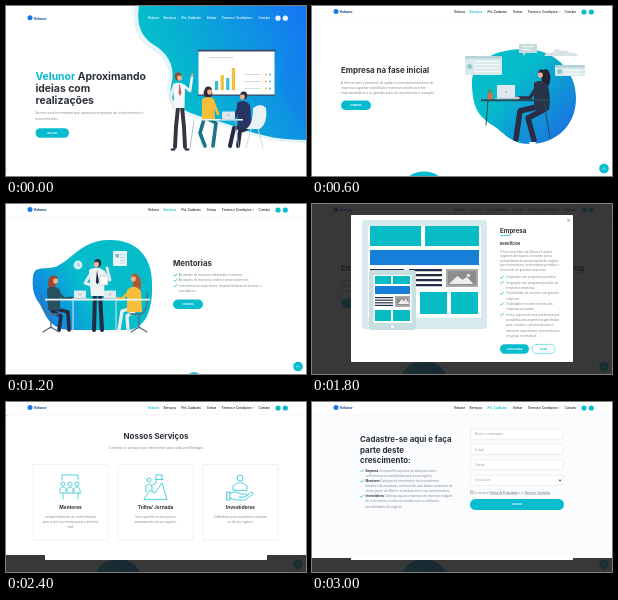
Animation, 300 px wide and 170 px high, one loop 3.6 s. Source, as an HTML page with a canvas:

```html
<!DOCTYPE html>
<html lang="pt">
<head>
<meta charset="utf-8">
<style>
html, body { margin: 0; width: 100%; height: 100%; overflow: hidden; background: #fff; }
canvas { display: block; width: 300px; height: 170px; }
</style>
</head>
<body>
<canvas id="stage"></canvas>
<script>
const W = 300, H = 170, HOLD = 600;
const CYAN = '#08bcd0', TEAL = '#05bccb', BLUE = '#1778e6', INK = '#2b3038', GREY = '#7b8087';
const NAVY = '#252b45', SKIN = '#f3b391', PALE = '#d9eaec', YELLOW = '#f6bd3a';
const HEAD = 'Inter, sans-serif', BODY = '"Open Sans", sans-serif';
const canvas = document.getElementById('stage');
const c = canvas.getContext('2d');
const ratio = window.devicePixelRatio || 1;
canvas.width = W * ratio;
canvas.height = H * ratio;
c.scale(ratio, ratio);

// Drawing helpers
function box(x, y, w, h, fill, r = 0, stroke) {
  c.beginPath();
  c.roundRect(x, y, w, h, r);
  if (fill) { c.fillStyle = fill; c.fill(); }
  if (stroke) { c.strokeStyle = stroke; c.lineWidth = 0.5; c.stroke(); }
}
function oval(x, y, rx, ry, fill) {
  c.beginPath();
  c.ellipse(x, y, rx, ry, 0, 0, Math.PI * 2);
  c.fillStyle = fill;
  c.fill();
}
function shape(d, fill) {
  c.fillStyle = fill;
  c.fill(new Path2D(d));
}
function stroke(d, color, width) {
  c.strokeStyle = color;
  c.lineWidth = width;
  c.lineCap = c.lineJoin = 'round';
  c.stroke(new Path2D(d));
}
function text(s, x, y, size, color = GREY, font = BODY, weight = 400, align = 'left') {
  c.font = `${weight} ${size}px ${font}`;
  c.fillStyle = color;
  c.textAlign = align;
  c.fillText(s, x, y);
}
const title = (s, x, y, size = 7.9, color = INK, align) => text(s, x, y, size, color, HEAD, 700, align);
function lines(list, x, y, step, size = 3, align) {
  list.forEach((s, i) => text(s, x, y + i * step, size, GREY, BODY, 400, align));
}
function gradient(x0, y0, x1, y1, from = TEAL, to = BLUE) {
  const g = c.createLinearGradient(x0, y0, x1, y1);
  g.addColorStop(0, from);
  g.addColorStop(1, to);
  return g;
}
function pill(s, x, y, w, h = 9.6) {
  box(x, y, w, h, CYAN, h / 2);
  text(s, x + w / 2, y + h / 2 + 0.9, 2.5, '#fff', HEAD, 700, 'center');
}
const check = (x, y) => stroke(`M${x} ${y}l1 1.1 2 -2.3`, CYAN, 0.75);

function nav(active, y = 6.8, color = INK) {
  const hero = y > 10;
  oval(24, y - 1.2, 2.5, 2.5, BLUE);
  text('Velunor', 27.5, y + 0.6, 3.4, '#245a9e', HEAD, 800);
  const items = [['Velunor', 142], ['Serviços', 157.5], ['Pré-Cadastro', 175.5], ['Entrar', 201.3], ['Termos e Condições', 215.7], ['Contato', 252.5]];
  items.forEach(([s, x], i) => text(s, x, y, 3, i === active ? CYAN : color, HEAD, 600));
  stroke(`M246.6 ${y - 1.3}l.7 .7 .7 -.7`, color, 0.35);
  for (const x of [272, 279.3]) oval(x, y - 0.8, 2.6, 2.6, hero ? '#e6f6fc' : CYAN);
}
function page(active, bg = '#fff') {
  box(0, 0, W, H, bg);
  box(0, 0, W, 12.5, '#fff');
  box(0, 12.5, W, 0.5, '#f1f3f4');
  nav(active);
}
function topButton() {
  oval(292, 162.5, 4.8, 4.8, CYAN);
  stroke('M290.4 163.2l1.6 -1.6 1.6 1.6', '#fff', 0.6);
}

function head(x, y, hair, side = 1) {
  oval(x - side * 0.7, y - 0.5, 3.5, 3.9, hair);
  oval(x + side * 0.6, y + 0.7, 2.4, 3, SKIN);
  shape(`M${x - 2.6} ${y - 1}Q${x} ${y - 4.6} ${x + 2.8} ${y - 1}Q${x} ${y - 2} ${x - 2.6} ${y - 1}Z`, hair);
}
function laptop(x, y, w, h, color = '#dfe8ef') {
  box(x, y, w, h, color, 1);
  oval(x + w / 2, y + h / 2, 0.9, 0.9, '#9fb3c2');
  box(x - 2, y + h, w + 5, 0.9, '#c6d3dc');
}

function heroScene() {
  box(0, 0, W, H, '#fff');
  shape('M127 0C126 20 131 34 145 43C160 52 166 63 161 80C160 101 178 110 200 115C230 121 250 137 300 137V0Z', '#e3f5fa');
  shape('M133 0C130 18 135 31 148 39C163 48 170 62 165 80C162 98 178 106 200 112C230 118 250 134 300 134V0Z', gradient(170, 80, 300, 20, TEAL, '#1479f2'));
  shape('M300 40C268 52 262 92 300 118Z', 'rgba(20,110,235,.16)');
  nav(-1, 13, '#fff');
  title('Velunor', 29.5, 73.6, 10.4, CYAN);
  const offset = c.measureText('Velunor ').width;
  title('Aproximando', 29.5 + offset, 73.6, 10.4);
  title('ideias com', 29.5, 86, 10.4);
  title('realizações', 29.5, 98.4, 10.4);
  lines(['Somos uma ferramenta que aproxima empresas do conhecimento e', 'investimentos.'], 29.5, 108.2, 5.6, 3.4);
  pill('INICIAR', 29.5, 122.2, 33.5);

  // Presentation board
  box(192.5, 45, 76, 44, '#fff', 0.5);
  box(191.5, 43.8, 78, 1.8, '#3a4a66', 0.8);
  box(191.5, 88.4, 78, 1.3, '#3a4a66', 0.6);
  box(203, 51, 24, 1, '#c9d6de');
  [9, 15, 12, 22].forEach((h, i) => box(209 + i * 5.6, 84 - h, 3.2, h, i % 2 ? YELLOW : '#35c0cf'));
  for (const y of [68, 75, 82]) {
    box(238, y, 17, 0.8, '#c9d6de');
    oval(260, y + 0.4, 1, 1, YELLOW);
    oval(264, y + 0.4, 1, 1, '#35c0cf');
  }

  // Speaker
  stroke('M172 101L170 121 169 141M176 101L178 121 179 141', '#35343f', 3.9);
  stroke('M168.5 143.5h-3M179.5 143.5h3', '#17243a', 1.8);
  shape('M167 78Q173 75 179 79L178.5 102H168.5Z', '#f5f8fb');
  stroke('M168 80L164.5 92 168 102', '#e5edf4', 2.8);
  stroke('M178 80L184 85 186 71', '#f5f8fb', 2.6);
  stroke('M186 71l.3 -3', SKIN, 1.7);
  shape('M173.5 77L172.5 87 174 90 175.5 87Z', '#d8574e');
  head(173, 71, '#8a4a32');

  // Table and two listeners
  stroke('M200 112L210 117 207 140M198 113L194 127 199 140', '#1b7487', 3.6);
  oval(202, 87, 4.4, 5, '#30283a');
  shape('M196 93Q202 89 208 93L209 113H196Z', YELLOW);
  stroke('M198 95L197 106 205 109M207 95L212 108', YELLOW, 2.7);
  head(203, 85, '#30283a');
  stroke('M240 121L228 122 224 140M240 123L234 125 232 140', NAVY, 4);
  shape('M231 97Q238 92 244 99L246 123H232Z', '#283563');
  stroke('M233 100L229 111 221 112', '#283563', 3);
  head(237, 90, NAVY, -1);
  box(181, 113, 56, 1.5, '#f2f6f8', 0.5);
  stroke('M188 115L184 142M229 115L233 142', '#9db2bf', 0.8);
  laptop(216, 105.5, 13, 7.5);
  shape('M247 102Q255 96 260 102Q262 117 254 123H240Q247 119 247 102Z', '#eaf1f4');
  stroke('M245 123L240 142M252 123L257 142', '#d1dbe1', 1);
  box(0, 163, 0.8, 0.8, '#777');
}

function earlyCopy() {
  title('Empresa na fase inicial', 29, 67.2);
  lines(['A Velunor tem o propósito de ajudar o ecossistema brasileiro de', 'empresas a ganhar visibilidade e estreitar a distância entre', 'empreendedores e os grandes polos de investimento e inovação.'], 29, 77.7, 5.2, 3.1);
  pill('CONFIRA', 29, 94.5, 30);
}
function infoCard(x, y, w, h) {
  box(x, y, w, h, PALE, 1);
  box(x, y, w, 2.4, '#b3d0d4', 1);
  for (let row = y + 5; row < y + h - 1; row += 3.3) box(x + 9, row, w - 12, 0.9, '#fff');
  oval(x + 4.7, y + h / 2 + 1, 2.5, 2.5, '#8fc9cf');
}
function earlyScene() {
  page(1);
  earlyCopy();
  shape('M160 80C158 54 185 43 212 43C242 43 264 64 264 92C264 120 244 138 217 138C198 138 192 126 180 119C166 110 161 101 160 80Z', gradient(205, 72, 257, 118, TEAL, '#1878df'));
  infoCard(153, 50, 37, 19);
  shape('M207 38H225V47H214L211 50V47H207Z', '#c6dadd');
  box(210, 40.3, 12, 0.9, '#fff');
  box(210, 43.2, 9, 0.9, '#fff');
  shape('M232 50Q235 45 240 47Q244 40 250 45Q256 44 258 47Q264 46 266 50Z', '#d7e3e5');
  infoCard(243, 59, 30, 11);

  // Woman at a desk
  stroke('M233 99L208 105 204 133M233 103L216 112 222 134', '#2b2b46', 5.4);
  stroke('M203 136h-5M223 137h-5', '#f5f8fa', 1.8);
  oval(234, 72, 4.4, 9, '#252437');
  shape('M222 77Q229 72 236 79Q239 91 237 104H222Z', '#283349');
  stroke('M225 81L218 92 207 92', '#283349', 3.7);
  stroke('M207 92l-4 0', SKIN, 1.8);
  head(229, 68, '#252437', -1);
  box(169, 93.3, 68, 1.9, '#24495b', 0.5);
  stroke('M176 95L174 119M232 95L238 132', '#24495b', 1);
  laptop(185, 79, 18, 13.3);
  stroke('M178 88l-2 -4M178 88l0 -5M178 88l2 -4', '#3a9c69', 1.5);
  box(175.5, 87, 5, 6.2, '#d86a50', 0.6);
  oval(112, 178, 19, 12.5, CYAN);
  topButton();
}

function mentorScene() {
  page(1);
  shape('M27 73C28 59 42 68 53 61C67 54 76 37 102 36C130 35 146 52 146 79C147 104 141 123 123 126H65C42 126 39 108 33 99C27 91 26 82 27 73Z', gradient(28, 105, 76, 79, '#147be9', TEAL));
  box(107, 47, 14, 15, '#eaf4f6', 0.7);
  box(109.5, 50, 3.5, 3.5, '#72bfc8');
  for (const y of [50.5, 53, 56, 58.5]) box(114, y, 5, 0.7, '#b4cdd2');
  oval(72, 61, 4.4, 4.4, '#d6f2f5');
  stroke('M72 58.5V61l2 1', BLUE, 0.5);

  // Standing mentor
  stroke('M89 90L88 126M94 90L96 126', NAVY, 4);
  shape('M83 66Q91 61 99 67L98 92H85Z', '#eef3f6');
  stroke('M85 69L79 79 88 82M98 69L104 76 101 64', '#e4edf3', 2.9);
  box(94, 72, 8, 9, '#fff', 0.5, '#9ab0be');
  shape('M91 66l-1.2 12 1.6 2.4 1.6 -2.4Z', NAVY);
  head(91, 59.5, '#33303e', -1);

  // Seated women on both sides
  stroke('M46 104L62 108 63 126M46 107L55 112 53 126', NAVY, 3.7);
  oval(46, 79, 4, 7, '#9a4937');
  shape('M41 85Q47 80 54 86L54 106H42Z', '#27515f');
  stroke('M51 87L58 95 66 94', '#27515f', 2.8);
  head(49, 76, '#9a4937');
  stroke('M36 89Q34 104 42 110H53M45 110V124M37 128L45 123 53 128', '#526f7f', 1.3);
  stroke('M129 103L116 107 113 126M130 106L121 112 122 126', '#e9edef', 3.4);
  oval(131, 80, 4.2, 8.5, '#a95b35');
  shape('M121 86Q128 79 135 87L136 108H121Z', YELLOW);
  stroke('M123 88L116 95 109 94', YELLOW, 2.8);
  head(128, 74, '#a95b35', -1);
  stroke('M141 89Q143 104 136 110H124M133 110V124M125 128L133 123 141 128', '#526f7f', 1.3);
  box(39, 94.7, 105, 1.8, '#f4f7f9', 0.5);
  stroke('M67 97V128M110 97V128', '#dde7eb', 1);
  laptop(68, 86.5, 12, 7.8);
  laptop(98, 86.5, 12, 7.8);

  title('Mentorias', 167, 62.2);
  for (const y of [71, 76.3, 81.7]) check(168, y);
  lines(['Atividades de mentoria individuais e coletivas;', 'Atividades de mentorias online e presencialmente;', 'com executivos experientes, empreendedores de sucesso e', 'investidores.'], 172.5, 72, 5.4);
  pill('CONFIRA', 167, 95.5, 30);
  oval(188, 176, 8, 8, '#35bde0');
  topButton();
}

function placeholder(x, y, w, h) {
  box(x, y, w, h, '#a9a9a9');
  box(x + 2, y + 2, w - 4, h - 4, '#8d8d8d');
  shape(`M${x + 3} ${y + h - 3}l${w * 0.26} ${-h * 0.45} ${w * 0.17} ${h * 0.22} ${w * 0.13} ${-h * 0.16} ${w * 0.2} ${h * 0.39}Z`, '#eee');
  oval(x + w * 0.7, y + h * 0.35, h * 0.09, h * 0.09, '#eee');
}
function modalScene() {
  page(1);
  earlyCopy();
  title('ng', 262, 67.2);
  oval(112, 177, 23, 20, gradient(92, 160, 133, 170));
  topButton();
  box(0, 0, W, H, 'rgba(27,27,27,.87)');
  box(39, 11, 222, 147, '#fff', 0.7);

  // Monitor
  box(50, 16, 125, 109, PALE, 3);
  box(56, 22, 113, 92, '#fff');
  box(58, 22, 51, 20, '#08bcc6');
  box(113, 22, 54, 20, '#08bcc6');
  box(58, 46, 109, 15, '#187fd8');
  for (let i = 0; i < 4; i++) {
    box(58, 65 + i * 5, 34, 2.2, NAVY);
    box(97, 65 + i * 5, 33, 2.2, NAVY);
  }
  placeholder(134, 65, 32, 18);
  box(108, 88, 27, 22, '#08bcc6');
  box(139, 88, 27, 22, '#08bcc6');

  // Tablet
  box(57, 66, 47, 60, '#c8dfe1', 3);
  box(61.5, 71, 38, 48, '#fff');
  box(63, 72, 16, 8, '#08bcc6');
  box(81, 72, 17, 8, '#08bcc6');
  box(63, 82, 35, 8, '#187fd8');
  for (let i = 0; i < 4; i++) box(63, 93 + i * 2.6, 18, 1.2, NAVY);
  placeholder(83, 92, 15, 11);
  box(63, 106, 16, 11, '#08bcc6');
  box(81, 106, 17, 11, '#08bcc6');
  oval(80.5, 122.5, 1.6, 1.6, '#fff');

  stroke('M255.6 15.4l2.2 2.2M257.8 15.4l-2.2 2.2', '#555', 0.5);
  title('Empresa', 188, 28.8, 6.2);
  box(188, 31.3, 10, 0.7, CYAN);
  title('Benefícios', 188, 41.4, 3.9);
  lines(['O foco prioritário da Velunor é apoiar', 'negócios de impacto iniciantes com a', 'possibilidade de apresentação do negócio', 'para investidores, aceleradoras privadas e', 'executivos de grandes empresas.'], 188, 48.6, 4.55);
  for (const y of [73.3, 78.7, 89.4, 100, 110.7]) check(188.5, y);
  lines(['Integração com programas paralelos', 'Integração com programa privados de', 'fomento a empresas', 'Possibilidade de conexão com grandes', 'empresas', 'Visibilidade e reconhecimento das', 'empresas acionadas', 'Com o suporte de uma plataforma que', 'possibilita uma experiência gamificada', 'para o usuário, conectando com os', 'mentores especialistas, com mentorias', 'em grupo e individual.'], 194, 74.4, 5.32, 2.95);
  pill('CADASTRAR', 188, 140.2, 29);
  box(220, 140.4, 23, 9.2, '#fff', 4.6, CYAN);
  text('Voltar', 231.5, 145.9, 2.4, CYAN, HEAD, 700, 'center');
}

// The lower part of the stage keeps the dimmed page while the top is renewed.
function aboveModal(bottom, draw) {
  modalScene();
  c.save();
  c.beginPath();
  c.rect(0, 0, W, bottom);
  c.clip();
  draw();
  c.restore();
}

function people(x, y) {
  for (const dx of [-7, 0, 7]) stroke(`M${x + dx - 2} ${y}a2 2 0 1 0 4 0a2 2 0 1 0 -4 0M${x + dx - 3} ${y + 8}v-3q3 -4 6 0v3`, CYAN, 0.65);
}
function servicesScene() {
  page(0);
  title('Nossos Serviços', 150, 37.3, 7.9, INK, 'center');
  lines(['Conheça os serviços que oferecemos para cada perfil/estágio'], 150, 46.5, 5, 3.3, 'center');
  const cards = [
    ['Mentores', 'compartilhamento de conhecimentos', 'para incluir sua empresa para o próximo', 'nível.'],
    ['Trilha/ Jornada', 'Uma experiência única para o', 'encantamento do seu negócio.'],
    ['Investidores', 'Visibilidade para investidores visitarem', 'ou do seu negócio.']
  ];
  cards.forEach(([name, ...copy], i) => {
    const x = 27 + i * 85;
    box(x, 62.5, 75, 75.5, '#fff', 1, '#dfe3e6');
    title(name, x + 37.5, 107.3, 4.8, INK, 'center');
    lines(copy, x + 37.5, 115.7, 5.2, 2.95, 'center');
  });
  people(64, 82);
  stroke('M54 91H75M57 91V97M72 91V97M56 78V73H72V78', CYAN, 0.65);
  stroke('M138 97L144 88 149 91 156 81 161 97ZM150 81V73h7l-1.5 2.3 1.5 2.2h-7M141 78a2 2 0 1 0 4 0a2 2 0 1 0 -4 0M140 90v-6q3 -4 6 0v5M145 84l5 -3', CYAN, 0.7);
  stroke('M231 76a3 3 0 1 0 6 0a3 3 0 1 0 -6 0M227 88v-4q7 -7 14 0v4ZM224 91l6 -1 5 2h5q2 2 -1 3h-6M240 94l6 -4q3 1 0 3l-7 5h-9l-6 -2M221 90h3v8h-3Z', CYAN, 0.7);
  box(0, 13.2, 0.8, 1, '#777');
}

function formScene() {
  page(2, '#fafcfd');
  c.fillStyle = '#f0f4f6';
  for (let y = 17; y < 156; y += 5) for (let x = 3; x < W; x += 5) c.fillRect(x, y, 0.5, 0.5);
  ['Cadastre-se aqui e faça', 'parte deste', 'crescimento:'].forEach((s, i) => title(s, 48, 40.4 + i * 10.4));
  const copy = [
    ['Empresa', 'Compartilhe aqui sua jornada para obter', 'conhecimento e visibilidade para o seu negócio.'],
    ['Mentores', 'Participe do crescimento do ecossistemas', 'brasileiro de empresas, conhecendo aqui ideias inovadoras de', 'vários países do Brasil e contribua com o seu conhecimento.'],
    ['Investidores', 'Conheça aqui as empresas em diversos estágios', 'de crescimento e entre em contato com as melhores', 'possibilidades de negócio.']
  ];
  let y = 69.8;
  for (const [name, first, ...rest] of copy) {
    check(48.5, y - 1);
    text(name, 53.5, y, 3, INK, BODY, 700);
    const dx = c.measureText(name + ' ').width;
    text(first, 53.5 + dx, y, 3);
    lines(rest, 53.5, y + 5.1, 5.1);
    y += 5.1 * (rest.length + 1);
  }
  ['Nome e sobrenome', 'E-mail', 'Celular', 'Eu sou um:'].forEach((label, i) => {
    const top = 27 + i * 15.4;
    box(158.5, top, 92.5, 10.2, '#fff', 1, '#d9dfe2');
    text(label, 163, top + 6.1, 3, '#8b9096');
  });
  shape('M246.7 77.8h2.6l-1.3 1.6Z', INK);
  box(158.5, 89.2, 2.6, 2.6, '#fff', 0.4, '#777');
  text('Eu aceito a', 162.5, 91.6, 2.75);
  let x = 162.5 + c.measureText('Eu aceito a ').width;
  for (const [s, linked] of [['Política de Privacidade', true], [' e os ', false], ['Termos e Condições', true]]) {
    text(s, x, 91.6, 2.75, linked ? '#4b6370' : GREY);
    const width = c.measureText(s).width;
    if (linked) box(x, 92.2, width, 0.25, '#4b6370');
    x += width;
  }
  box(158, 97, 94, 11, CYAN, 5.5);
  text('ENVIAR', 205, 103.3, 2.5, '#fff', HEAD, 700, 'center');
}

const scenes = [
  heroScene, earlyScene, mentorScene, modalScene,
  () => aboveModal(153, servicesScene),
  () => aboveModal(156, formScene)
];
let shown = -1;
function tick() {
  const index = Math.floor(performance.now() / HOLD) % scenes.length;
  if (index !== shown) {
    shown = index;
    c.clearRect(0, 0, W, H);
    scenes[index]();
  }
  requestAnimationFrame(tick);
}
tick();
</script>
</body>
</html>
```
